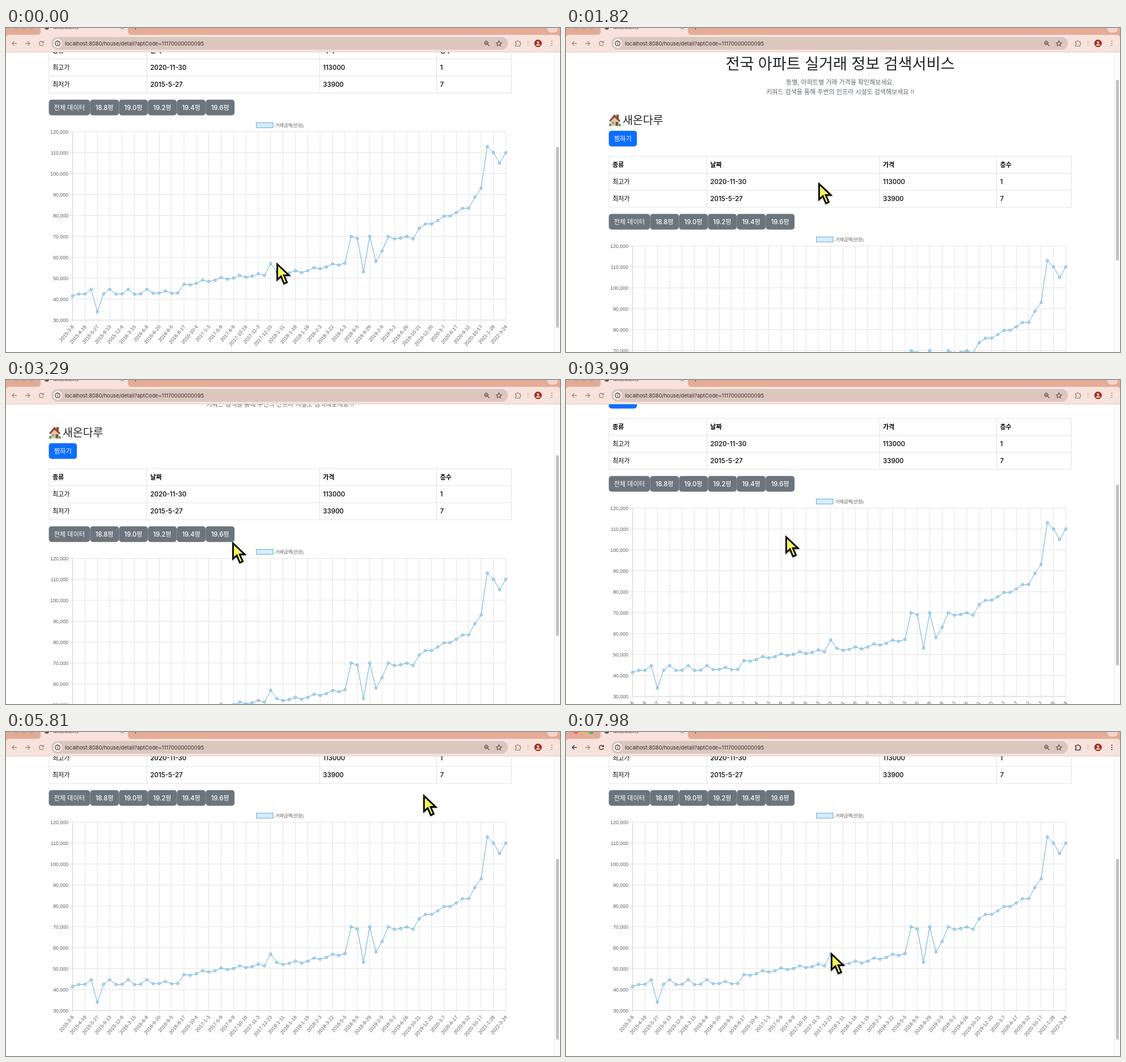
An HTML page that plays this animation: 977x573 px, repeating every 8 s.

```html
<!DOCTYPE html>
<html lang="ko">
<head>
<meta charset="utf-8">
<title>MildRooms</title>
<style>
  html, body { margin: 0; width: 100%; height: 100%; overflow: hidden; background: #fff; }
  svg { display: block; }
  text { font-family: Inter, "Noto Sans CJK KR", "Noto Sans CJK", sans-serif; white-space: pre; }
  .chart text { font-family: "Liberation Sans", "Noto Sans CJK KR", sans-serif; fill: #5c5c5c; }
  .icon { fill: none; stroke: #94807a; stroke-width: 1.2; }
  .active .live { stroke: #2a2120; }
  .light { fill: #d6a093; }
  .active .red { fill: #f4615a; }
  .active .yellow { fill: #f5bd3f; }
  .active .green { fill: #4cbb50; }
  #cursor { filter: drop-shadow(0 1.5px 1.5px rgba(0, 0, 0, .3)); }
</style>
</head>
<body>
<svg width="977" height="573" viewBox="0 0 977 573">
  <g id="page"></g>

  <path d="M967.5 43V573" stroke="#e8e8e8"/>
  <rect id="thumb" x="970" y="45" width="5" height="320" rx="2.5" fill="#c1c1c1"/>

  <g id="chrome">
    <rect width="977" height="43" fill="#e5ab99"/>
    <path d="M0 42V18Q0 12 6 12H55Q61 12 61 6V0H215V6Q215 12 221 12H971Q977 12 977 18V42Z" fill="#f7e3dc"/>
    <path d="M0 42.5H977" stroke="#e3cfc8"/>
    <rect x="955" y="-10" width="18" height="18" rx="6" fill="#f3d5ca"/>
    <circle class="light red" cx="17.5" cy="-.5" r="4"/>
    <circle class="light yellow" cx="31" cy="-.5" r="4"/>
    <circle class="light green" cx="44.5" cy="-.5" r="4"/>
    <circle cx="72" cy="-1" r="4" fill="#5f5654"/>
    <text x="83" y="2.3" font-size="8.6" fill="#4a3f3c">MildRooms</text>
    <path d="M202.5 -3L207.5 2M207.5 -3L202.5 2M225 -.5H232M228.5 -4V3" stroke="#5f4a44"/>

    <rect x="80" y="16" width="805" height="22.5" rx="11.2" fill="#dac7bf"/>
    <circle cx="91" cy="27.3" r="8" fill="#f7e9e4"/>
    <circle cx="91" cy="27.3" r="4.2" fill="none" stroke="#332a28" stroke-width="1.1"/>
    <path d="M91 26.7V29.6M91 24.8V25.8" stroke="#332a28" stroke-width="1.1"/>
    <text x="104" y="30.6" font-size="9.25" fill="#352c2a">localhost:8080/house/detail?aptCode=11170000000095</text>

    <path class="icon live" d="M19 27.3H11M14.8 23.5L11 27.3L14.8 31.1"/>
    <path class="icon" d="M34 27.3H42M38.2 23.5L42 27.3L38.2 31.1"/>
    <path class="icon live" d="M65.6 25.4A3.8 3.8 0 1 0 66 28.5M66.2 23V26H63.2"/>
    <g fill="none" stroke="#5a4a46" stroke-width="1.1">
      <circle cx="847" cy="26.3" r="3"/>
      <path d="M849.2 28.5L852.5 31.8M845.5 26.3H848.5M847 24.8V27.8"/>
      <path d="M869.3 22.5L870.7 25.7L874.1 26L871.5 28.3L872.3 31.7L869.3 29.9L866.3 31.7L867.1 28.3L864.5 26L867.9 25.7Z"/>
    </g>
    <path class="icon live" d="M898.5 24H901.3A1.5 1.5 0 0 1 904.3 24H906.5V26.3A1.5 1.5 0 0 1 906.5 29.3V31.8H898.5V29.5A1.5 1.5 0 0 0 898.5 26.5Z"/>
    <path d="M920.5 22V32" stroke="#e9aa98"/>
    <circle cx="938.3" cy="27.2" r="6.6" fill="#a92c20"/>
    <circle cx="938.3" cy="25.3" r="1.9" fill="#fbe6e0"/>
    <path d="M934.5 31Q934.8 28.3 938.3 28.3T942.1 31Z" fill="#fbe6e0"/>
    <path class="icon live" d="M962.5 22.5V24.3M962.5 26.4V28.2M962.5 30.3V32.1" style="stroke-width:1.8"/>
  </g>

  <path id="cursor" d="M2.4 3.8V31.2L9 25.2L14.4 38L19.4 35.8L14 23.4H23Z" fill="#fbf65e" stroke="#000" stroke-width="2.8"/>
</svg>

<script>
const LOOP = 8000, STEP = 70;
const $ = id => document.getElementById(id);
const range = n => [...Array(n).keys()];
const mix = (a, b, p) => a + (b - a) * p;

const text = (x, y, size, str, attrs = '') =>
  `<text x="${x}" y="${y}" font-size="${size}" ${attrs}>${str}</text>`;
const line = (d, color) => `<path d="${d}" fill="none" stroke="${color}"/>`;
const button = (x, y, w, label, color) =>
  `<rect x="${x}" y="${y}" width="${w}" height="27.6" rx="4.6" fill="${color}"/>` +
  text(x + w / 2, y + 17.8, 11.2, label, 'text-anchor="middle" font-weight="500" fill="#fff"');

function header() {
  const mid = 'text-anchor="middle"';
  const menu = [[636, '회원관리'], [697, '공지 사항'], [760, '마이페이지'], [831, '로그아웃']];
  return text(75.5, 76, 16.5, 'MildRooms', 'fill="#1b6ec2"') +
    text(483, 67.5, 11.5, '<tspan font-weight="700">다온(ADMIN)</tspan>님 반갑습니당^_^') +
    menu.map(([x, s]) => text(x, 73.6, 11, `[${s}]`)).join('') +
    line('M76 96.5H891', '#e3e5e8') +
    text(483.5, 153, 27.2, '전국 아파트 실거래 정보 검색서비스', mid + ' font-weight="500" fill="#212529"') +
    text(483.5, 179.5, 11, '동별, 아파트별 거래 가격을 확인해보세요.', mid + ' fill="#62686e"') +
    text(483.5, 196.8, 11, '키워드 검색을 통해 주변의 인프라 시설도 검색해보세요 !!', mid + ' fill="#62686e"');
}

function house() {
  return `<path d="M89 233H93V243H89Z" fill="#8f5342"/>
    <path d="M79 243L86 236L94 243V253.5H79Z" fill="#e3c9a4"/>
    <path d="M76 244L85.5 232.5L96 244L94 246L85.5 238L78 246Z" fill="#8f4b3b"/>
    <path d="M87.5 246H92V253H87.5Z" fill="#7d5138"/>
    <path d="M81 246H85V250H81Z" fill="#6fa9c8"/>
    <path d="M76 253.5V250Q78 247 80 250.5V253.5ZM93 253.5V250Q95 248 97 251V253.5Z" fill="#66994a"/>` +
    text(100, 250, 19.4, '새온다루', 'font-weight="500" fill="#212529"') +
    button(75.5, 261.8, 49.5, '찜하기', '#0d6efd');
}

function table() {
  const cols = [76, 248.5, 553, 759.5];
  const rows = [
    ['종류', '날짜', '가격', '층수'],
    ['최고가', '2020-11-30', '113000', '1'],
    ['최저가', '2015-5-27', '33900', '7']];
  const grid = range(4).map(i => `M75.5 ${307 + 30 * i}H891.5`).join('') +
    [...cols, 891].map(x => `M${x} 307V397`).join('');
  const cells = rows.map((row, r) => row.map((s, c) =>
    text(cols[c] + 6, 326 + 30 * r, c && r ? 11.5 : 11, s, `font-weight="${r ? 450 : 700}"`)).join(''));
  const sizes = ['전체 데이터', '18.8평', '19.0평', '19.2평', '19.4평', '19.6평'];
  return line(grid, '#dee2e6') + cells.join('') + sizes.map((s, i) =>
    button(i ? 97.2 + 51 * i : 75.5, 408.8, i ? 50.8 : 72.5, s, '#6c757d')).join('');
}

// A slow climb with a light wobble, broken by a few dips and spikes (in thousands).
function price(i) {
  const odd = { 0: 41.5, 4: 33.9, 32: 57, 46: 69, 47: 53, 48: 70, 49: 58, 50: 63, 67: 113, 69: 105 };
  const wobble = Math.cos(i * 2.1) * (i < 13 ? 1.5 : .7);
  const trend = i < 18 ? 43.2
    : i < 45 ? 44.5 + 7.5 * Math.sqrt((i - 17) / 15) + Math.max(0, i - 37) * .4
    : i < 56 ? 69.3
    : i < 65 ? 74 + (i - 56) * 1.25
    : i < 67 ? 88.8 + (i - 65) * 4.2 : 110;
  return odd[i] ?? trend + (i < 65 ? wobble : 0);
}

function chart() {
  const dates = ('2015-3-8 2015-4-18 2015-5-27 2015-9-13 2015-12-6 2016-3-15 2016-6-8 2016-6-20 ' +
    '2016-8-5 2016-8-17 2016-10-4 2017-1-3 2017-5-9 2017-6-9 2017-10-18 2017-11-3 2017-12-23 ' +
    '2018-1-11 2018-1-18 2018-1-19 2018-2-3 2018-3-22 2018-5-3 2018-9-5 2018-9-29 2019-2-9 ' +
    '2019-5-2 2019-6-26 2019-10-21 2019-12-20 2020-3-7 2020-6-17 2020-9-12 2020-10-17 ' +
    '2021-1-28 2022-3-24').split(' ');
  const px = i => +(117.5 + i * 764 / 70).toFixed(2);
  const py = v => +(798.5 - (v - 30) * 3.7).toFixed(2);
  const ticks = range(10).map(i => 30 + 10 * i);
  const points = range(71).map(i => [px(i), py(price(i))]);
  const grid = dates.map((_, i) => `M${px(2 * i)} 465.5V804`).join('') +
    ticks.map(v => `M112 ${py(v)}H881.5`).join('');
  const blue = '#62aedb';
  return '<g class="chart">' + line(grid, '#e4e4e4') + line('M117.5 465.5V798.5H881.5', '#d0d0d0') +
    `<rect x="441.5" y="449.5" width="29.5" height="8.8" fill="#d7ecfb" stroke="${blue}"/>` +
    text(475, 456.6, 8.1, '거래금액(만원)') +
    ticks.map(v => text(109.8, py(v) + 3, 8.8, v + ',000', 'text-anchor="end"')).join('') +
    dates.map((s, i) => text(0, 3, 8.8, s,
      `text-anchor="end" transform="translate(${px(2 * i) + .7} 808.5) rotate(-50)"`)).join('') +
    line('M' + points.join('L'), blue) +
    points.map(([x, y]) => `<circle cx="${x}" cy="${y}" r="2.2" fill="#b5dcf5" ` +
      `fill-opacity=".7" stroke="${blue}"/>`).join('') + '</g>';
}

// Each move: start, end, then the value reached; the value rests between moves.
const scrollMoves = [[0, 210, 0], [1120, 1260, 40], [1610, 1820, 80], [2520, 2730, 121],
  [2870, 3010, 150], [3570, 3990, 239], [4970, 5180, 230.5], [5180, 5810, 306]];
const cursorMoves = [[280, 630, 408, 271], [770, 1050, 444, 272], [1960, 2310, 398, 285],
  [3710, 3990, 386, 274], [4130, 4340, 263, 230], [4340, 4620, 720, 150], [4620, 5180, 453, 62],
  [5180, 6090, 860, 130], [6090, 6300, 950, 330], [6300, 6580, 361, 450], [6580, 6720, 388, 412],
  [6720, 6930, 520, 500], [6930, 7490, 512, 356], [7490, 7840, 466, 389]];
const WINDOW_ACTIVE = 7000;

const follow = (start, moves, t) => moves.reduce((pos, [from, to, ...goal]) => {
  const p = Math.min(1, Math.max(0, (t - from) / (to - from)));
  return pos.map((v, n) => mix(v, goal[n], p));
}, start);

function draw() {
  const t = Math.floor(performance.now() % LOOP / STEP) * STEP;
  const [scroll] = follow([282], scrollMoves, t);
  $('page').setAttribute('transform', `translate(0 ${-scroll})`);
  $('thumb').setAttribute('y', 45 + scroll * .585);
  $('cursor').setAttribute('transform', `translate(${follow([476, 414], cursorMoves, t)})`);
  $('chrome').classList.toggle('active', t >= WINDOW_ACTIVE);
  requestAnimationFrame(draw);
}

$('page').innerHTML = header() + house() + table() + chart();
draw();
</script>
</body>
</html>
```
